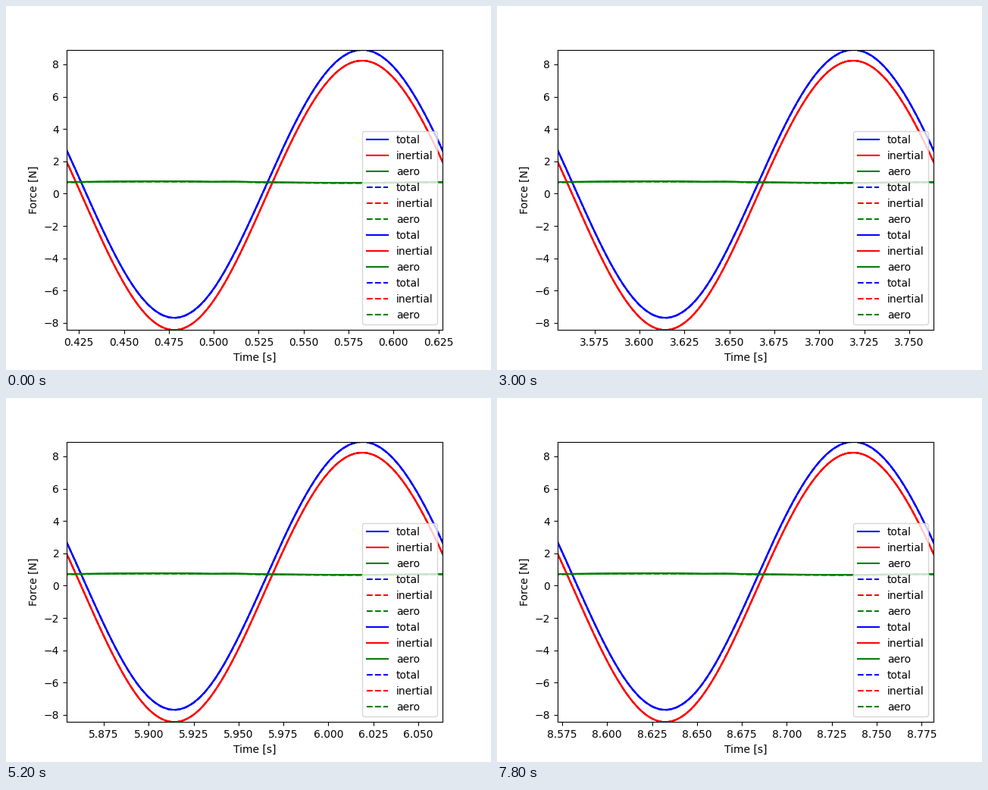
Write a matplotlib script that moves like this. It is 640x480 px and loops after 8000 ms.

```python
import numpy as np
import matplotlib.pyplot as plt
from matplotlib.animation import FuncAnimation

PERIOD = 0.209085   # seconds per revolution
TROUGH = 0.2863     # part of the cycle at which the inertial force is lowest
FRAMES = 40

phase = np.linspace(-0.1, 1.1, 400)


def inertial_force(p):
    a = 2 * np.pi * (p - TROUGH)
    return -8.335 * np.cos(a) - 0.105 * np.cos(2 * a)


def aero_force(p):
    ripple = np.cos(2 * np.pi * (p - 0.46) / 0.18)
    window = np.exp(-((p - 0.42) / 0.09) ** 2)
    return 0.715 + 0.045 * np.sin(2 * np.pi * p) + 0.014 * ripple * window


fig, ax = plt.subplots(figsize=(6.4, 4.8), dpi=100)
lines = []
for style, shift in [("-", 0), ("--", -0.012)] * 2:
    inertial = inertial_force(phase)
    aero = aero_force(phase) + shift
    for name, color, force in [("total", "b", inertial + aero),
                               ("inertial", "r", inertial),
                               ("aero", "g", aero)]:
        lines += ax.plot(phase, force, color + style, label=name)

ax.set_ylim(-8.437, 8.907)
ax.set_xlabel("Time [s]")
ax.set_ylabel("Force [N]")
ax.legend(loc="lower right")


def draw(i):
    cycle = i + 2
    for line in lines:
        line.set_xdata((cycle + phase) * PERIOD)
    ax.set_xlim(cycle * PERIOD, (cycle + 1) * PERIOD)
    return lines


anim = FuncAnimation(fig, draw, frames=FRAMES, interval=200,
                     repeat=True, repeat_delay=0)
plt.show()
```
